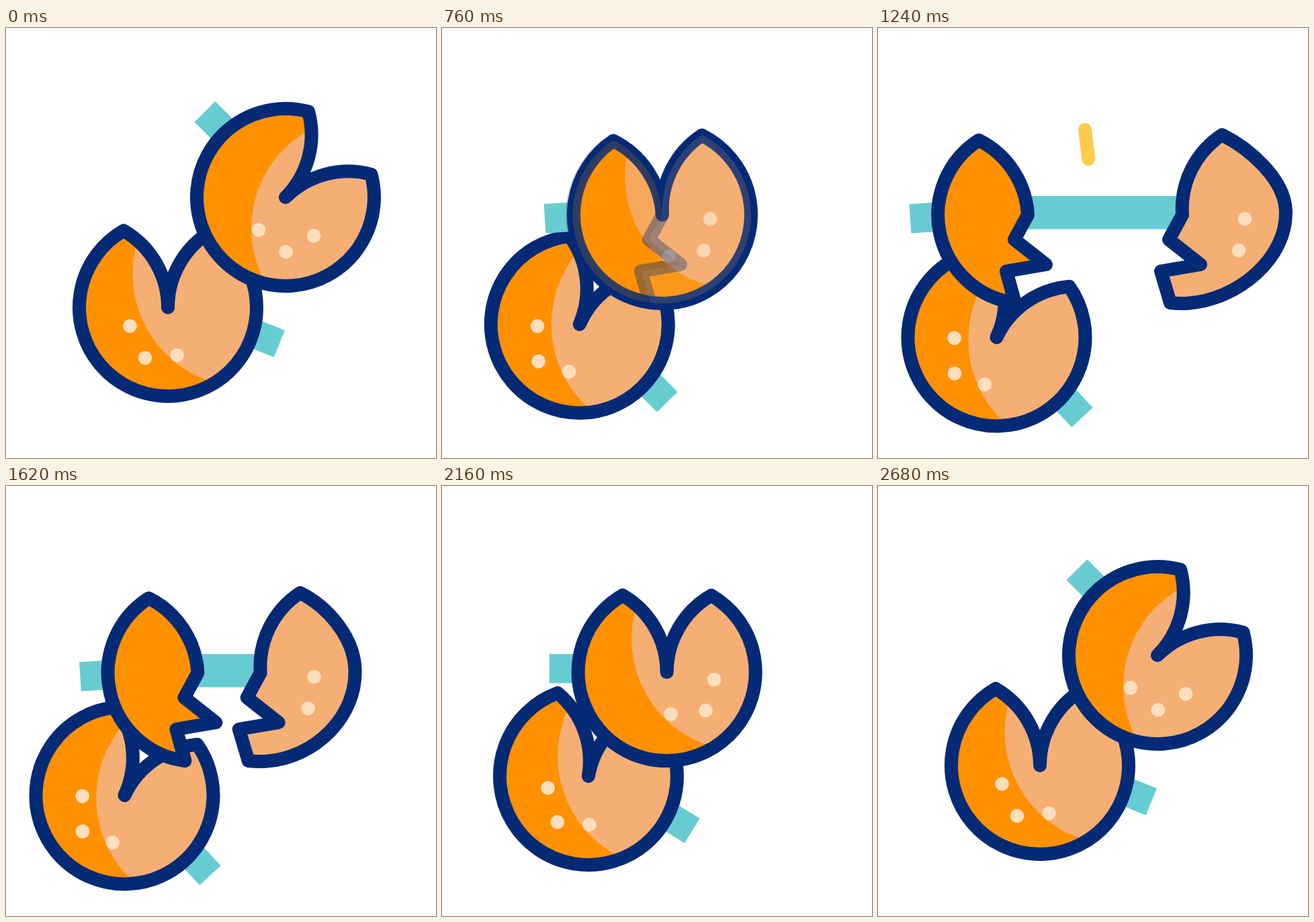
An HTML page for the animation above (2.82 s loop, 640 by 640 pixels).

```html
<!DOCTYPE html>
<html lang="en">
<head>
<meta charset="utf-8">
<title>Fortune cookies</title>
<style>
  html, body { margin: 0; height: 100%; overflow: hidden; background: #fff; }
  svg { display: block; width: 100vw; height: 100vh; }
  .line { stroke: #042a76; stroke-width: 20; stroke-linejoin: round; }
  .orange { fill: #ff9100; }
  .peach { fill: #f5af74; }
  .dots { fill: #fedfbd; }
  .paper { fill: #67ccd1; }
</style>
</head>
<body>
<svg viewBox="0 0 640 640">
  <defs>
    <path id="shape" d="M0 0A132 132 0 0 1 66-114.3A132 132 0 1 1-66-114.3A132 132 0 0 1 0 0Z"/>
    <clipPath id="inside"><use href="#shape"/></clipPath>
    <g id="cookie">
      <use href="#shape" class="orange"/>
      <circle cx="115.5" cy="-50" r="168" class="peach" clip-path="url(#inside)"/>
      <use href="#shape" class="line" fill="none"/>
    </g>
  </defs>

  <g id="lower">
    <rect class="paper" x="60" y="-33.5" width="114" height="43" transform="rotate(22)"/>
    <use href="#cookie"/>
    <g class="dots">
      <circle cx="-56.5" cy="27.5" r="10.3"/>
      <circle cx="-34" cy="75" r="10.3"/>
      <circle cx="13.5" cy="71" r="10.3"/>
    </g>
  </g>

  <path id="ray" stroke="#ffcb4f" stroke-width="20" stroke-linecap="round"/>
  <rect id="strip" class="paper" y="250" height="49.5"/>
  <rect id="tab" class="paper" x="-175" y="-27" width="110" height="43.5"/>

  <g id="whole">
    <use href="#cookie"/>
    <g class="dots">
      <circle cx="6" cy="62.5" r="10.3"/>
      <circle cx="58" cy="57" r="10.3"/>
      <circle cx="70.4" cy="10.8" r="10.3"/>
    </g>
  </g>

  <g id="halves">
    <path id="left" class="line orange"
      d="M0 0L-20 37L27 74L-32 84L-19 131A132 132 0 0 1-73-111A132 132 0 0 1 0 0Z"/>
    <g id="right">
      <path id="rightShape" class="line peach"/>
      <g id="rightDots" class="dots">
        <circle cx="71" cy="6" r="10.3"/>
        <circle cx="62" cy="53" r="10.3"/>
      </g>
    </g>
  </g>
</svg>
<script>
const LOOP = 2820;
const REST = { x: 328, y: 278 };
const el = id => document.getElementById(id);
const set = (id, attrs) => {
  for (const name in attrs) el(id).setAttribute(name, attrs[name]);
};
const place = (x, y, angle = 0) => `translate(${x} ${y}) rotate(${angle})`;
const ramp = (t, from, to) => Math.min(1, Math.max(0, (t - from) / (to - from)));
const ease = (t, from, to) => {
  const u = ramp(t, from, to);
  return u * u * (3 - 2 * u);
};

// The outer edge of the right half bulges while it slides away.
const rightPath = bulge => `M0 0A132 132 0 0 1 59-119
  C100-98.5 ${128.8 + bulge}-54.2 ${131.7 + bulge}-8.3
  C${136.3 + bulge} 64.5 81 127.1 8.3 131.7
  A132 132 0 0 1-18 131L-32 84L27 74L-20 37Z`;

function drawLower(t) {
  const shift = ease(t, 550, 940) - ease(t, 1910, 2331);
  const turn = ease(t, 480, 810) - ease(t, 1925, 2335);
  set('lower', { transform: place(241 - 64.5 * shift, 416 + 44.5 * shift, 25 * turn) });
}

function drawRay(t) {
  const tail = 28 + 230 * ease(t, 1126, 1486);
  const head = 28 + 230 * ease(t, 1077, 1437);
  const point = d => `${323.5 - 0.122 * d} ${278 - 0.993 * d}`;
  set('ray', { d: head > tail ? `M${point(tail)}L${point(head)}` : '' });
}

function drawUpper(t) {
  const back = ease(t, 2060, 2660);
  const x = 416 - 88 * (ease(t, 0, 570) - back);
  const y = 252 - 36 * ease(t, 300, 640) + 62 * ramp(t, 640, 740) ** 2
    - 26 * back + 4.5 * Math.sin(Math.PI * back);
  const angle = 45 - 48.6 * (ease(t, 0, 540) - back);
  const crack = ramp(t, 740, 835) - ramp(t, 1870, 1930);
  const open = ease(t, 825, 1240) - ease(t, 1300, 1870);
  const leftX = REST.x - 105 * open;
  const rightX = REST.x + 125 * open;

  set('tab', { transform: place(x - 105 * open, y, angle) });
  set('whole', { transform: place(x, y, angle), visibility: crack < 1 ? 'visible' : 'hidden' });
  set('strip', { x: leftX - 30, width: open > 0 ? rightX - leftX + 60 : 0 });
  set('halves', {
    'fill-opacity': crack,
    'stroke-opacity': crack,
    visibility: crack > 0 ? 'visible' : 'hidden'
  });
  set('left', { transform: place(leftX, REST.y) });
  set('right', { transform: place(rightX, REST.y) });
  set('rightShape', { d: rightPath(22 * open) });
  set('rightDots', { transform: place(22 * open, 0) });
}

const start = performance.now();
function frame() {
  const t = (performance.now() - start) % LOOP;
  drawLower(t);
  drawRay(t);
  drawUpper(t);
  requestAnimationFrame(frame);
}
frame();
</script>
</body>
</html>
```
